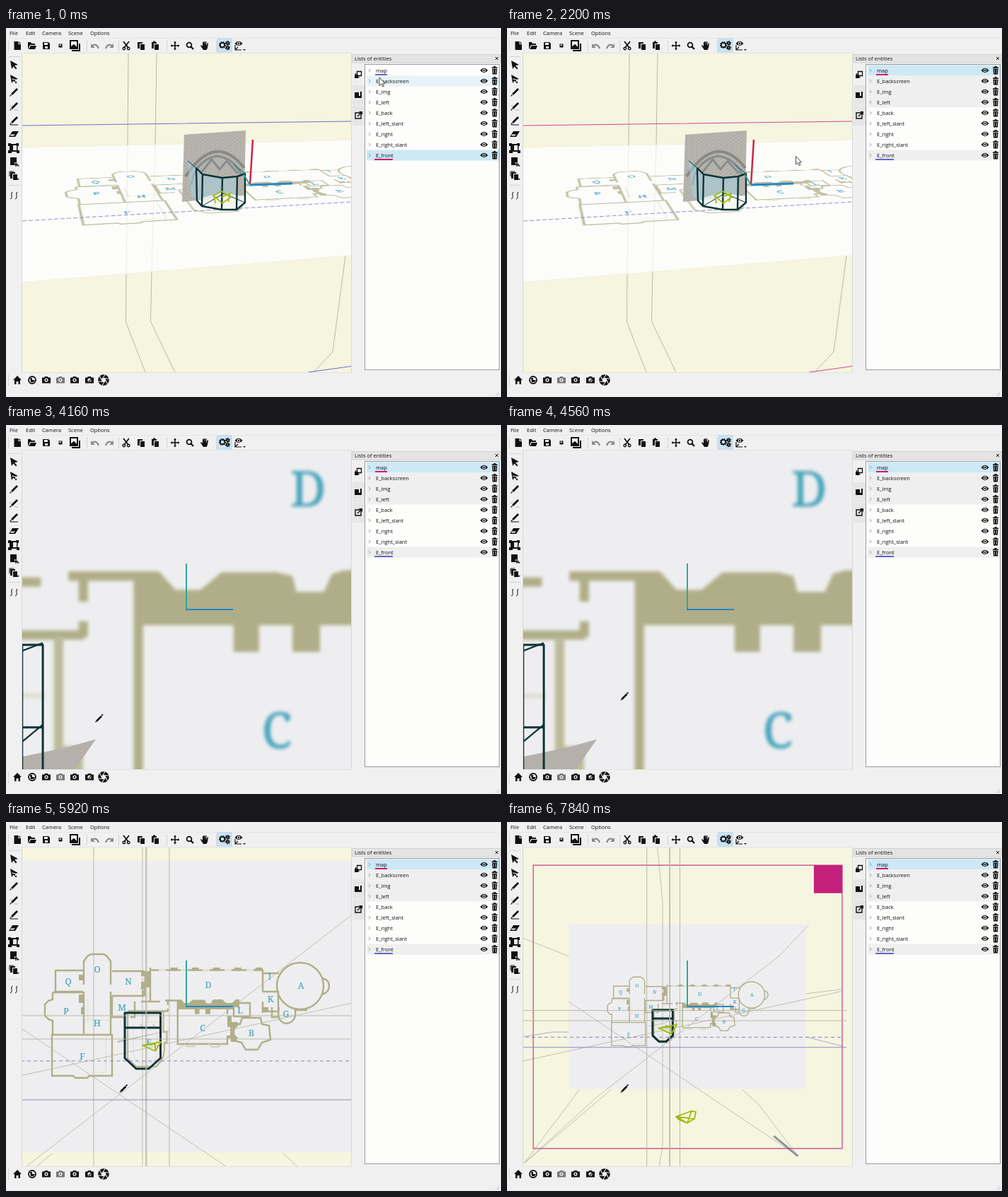
Write an HTML page that moves like this. It is 700x522 px and loops after 7880 ms.

```html
<!DOCTYPE html>
<html lang="en">
<head>
<meta charset="utf-8">
<title>Entity viewer</title>
<style>
html, body { margin: 0; width: 100%; height: 100%; overflow: hidden; background: #f0f0f0; }
#stage { position: absolute; left: 0; top: 0; width: 700px; height: 522px; overflow: hidden; background: #f0f0f0; }
svg { position: absolute; left: 0; top: 0; overflow: visible; }
#view { position: absolute; inset: 0; background: #f5f5e0; clip-path: inset(36px 212px 35px 23px); }
#plan { transform-origin: 0 0; }
text { font: 7.5px "Open Sans", "Noto Sans", sans-serif; fill: #111; }
#letters text { font: 400 12.4px "Noto Serif", serif; fill: #48a4bc; stroke: #48a4bc; stroke-width: .2; text-anchor: middle; }
.line { fill: none; vector-effect: non-scaling-stroke; }
.wire { fill: none; stroke: #0d3338; stroke-linejoin: round; vector-effect: non-scaling-stroke; }
.hidden { display: none; }
</style>
</head>
<body>
<div id="stage">
<svg id="ui" width="700" height="522"></svg>

<div id="view">
  <svg id="plan" width="700" height="522">
    <defs><filter id="soft" x="-5%" y="-5%" width="110%" height="110%"><feGaussianBlur stdDeviation=".5"/></filter></defs>
    <g id="planScale"><g transform="translate(-255 -261)">
      <rect id="sheet" x="-42" y="55" width="594" height="412"/>
      <g id="walls" filter="url(#soft)" fill="none" stroke="#b0ae88" stroke-width="2.4"></g>
      <g id="letters" filter="url(#soft)"></g>
    </g></g>
  </svg>

  <svg id="persp" width="700" height="522" fill="none">
    <defs><pattern id="stone" width="7" height="5" patternUnits="userSpaceOnUse">
      <rect width="7" height="5" fill="#b9b5af"/><path d="M0 1h3M4 3h3M2 4.500h2" stroke="#a39f99" stroke-width=".8"/>
    </pattern></defs>
    <g stroke="#b3b3a8" stroke-width=".9">
      <path d="M173 36 172 166M213 36 211 165M170 348 169.500 416 197 487M206 345 204.500 415 239 487M480 322 462 458 435 487"/>
      <path d="M172 166 170 348M211 165 206 345" opacity=".25"/>
    </g>
    <path id="horizon" d="M23 138 488 132M427 487 488 478.500" stroke-width="1.1"/>
    <path d="M23 273 488 246" stroke="#8584c4" stroke-width=".9" stroke-dasharray="6 3"/>
    <path d="M252 151 339 145 337 237 249 246Z" fill="url(#stone)"/>
    <path d="M254 210Q296 146 337 198" stroke="#898886" stroke-width="4"/>
    <path d="M262 222Q267 188 298 181 322 184 333 208M274 207 291 186 302 200 312 188 328 206" stroke="#878d8e" stroke-width="3"/>
    <path d="M257 190 278 206 306 211 327 209V238L306 233 278 246 262 238Z" fill="#a5d5e3" opacity=".5"/>
    <path d="M278 240 306 232 337 239V247L326 257H305L277 252Z" fill="#f4f6ef" opacity=".8"/>
    <g stroke="#0d3338" stroke-width="2.4" stroke-linejoin="round">
      <path d="M269 198 278 207 306 212 327 210 338 206V247L326 257H305L277 252 270 244ZM278 207 277 252M306 212 305 257M327 210 326 257"/>
      <path d="M322 193 338 206M257 188 269 198" stroke="#2d7f8c" stroke-width="1.500"/>
      <path d="M338 247 308 234 277 252" stroke-width="1"/>
    </g>
    <path d="M293 237 305 231 318 239 306 248ZM296 248 294 236M314 246 317 234 305 239" stroke="#9dbb12" stroke-width="1.700"/>
    <path d="M345 222 349 158" stroke="#c9283f" stroke-width="2.500"/>
    <path d="M345 222 405 220" stroke="#2288c4" stroke-width="2.800"/>
    <path d="M345 222 336 207" stroke="#2aa59a" stroke-width="2"/>
  </svg>

  <svg id="top" width="700" height="522" fill="none">
    <g id="ground">
      <g id="rays" stroke="#b4b4a4" stroke-width=".8"></g>
      <path class="line" d="M-900 77H390" stroke="#8281c2" stroke-width="1" stroke-dasharray="5 4"/>
      <rect class="line" x="-386" y="-354" width="774" height="710" stroke="#c63a8c" stroke-width="1.200"/>
      <rect x="317" y="-354" width="71" height="70" fill="#c4207c"/>
      <path id="picture" fill="#b5b0aa"/>
      <path id="glass" fill="#a5d2de"/>
      <path class="wire" d="M-87 9H-36.500V73L-53 88H-71L-87 73ZM-87 30H-36.500" stroke-width="3"/>
      <g id="inner">
        <path class="wire" d="M-87 10.500H-41.700L-36.500 8.500M-41.700 9V77M-41.700 33.600-36.500 29.300M-87 34Q-72 32-60 34T-41.700 33.600M-87 30Q-66 37-50 32" stroke-width="2.200"/>
      </g>
    </g>
    <g id="high">
      <path class="line" d="M-131-2000V2000M-56-2000V2000M-24-2000V2000M-900 13H514M-900 46H514" stroke="#b4b4a2" stroke-width=".9"/>
      <path class="line" d="M-57.500-2000V2000" stroke="#b4b4a2" stroke-width=".9"/>
      <path class="line" d="M-900 132H514" stroke="#8d8cc4" stroke-width="1"/>
    </g>
    <path d="M255 196V261" stroke="#2fa79d" stroke-width="2"/>
    <path d="M254 261H321" stroke="#2288c4" stroke-width="2"/>
    <g stroke="#9dbb12" stroke-width="1.800" stroke-linejoin="round">
      <path id="nearCam" d="M-13-1 13-6 5 7ZM-13-1 5-3 5 7"/>
      <path id="farCam" d="M-14 0 8-8 14-7 12 3 2 9ZM-14 0 12 3M-14 0-10 4 2 9M8-8 2 9"/>
    </g>
  </svg>
</div>

<svg id="pointer" width="700" height="522">
  <path id="arrow" d="M0 0V11.500L2.600 9 4.600 13 6.400 12.200 4.500 8.400H8Z" fill="#fff" stroke="#222" stroke-width=".8"/>
  <g id="brush"><path d="M-3.500 4 3.500-3" stroke="#111" stroke-width="2.600"/><path d="M-5.500 6-3 5-4.500 3.500ZM3-4.500 5-6 6-5 4.500-3Z" fill="#111"/></g>
</svg>
</div>

<script>
const LOOP = 7880, SELECT_AT = 1520, TOP_AT = 3480;
const PINK = "#c4207c", BLUE = "#6463d0";
const $ = id => document.getElementById(id);

function add(parent, tag, attrs, content) {
  const node = document.createElementNS("http://www.w3.org/2000/svg", tag);
  for (const key in attrs) node.setAttribute(key, attrs[key]);
  if (content) node.textContent = content;
  parent.appendChild(node);
  return node;
}
const ui = $("ui");
const box = (x, y, width, height, fill, extra) => add(ui, "rect", { x, y, width, height, fill, ...extra });
const label = (x, y, content) => add(ui, "text", { x, y }, content);
const icon = (x, y, d, color = "#111", extra) =>
  add(ui, "path", { d, transform: `translate(${x} ${y})`, fill: color, "fill-rule": "evenodd", ...extra });
const sketch = (x, y, d, width = 1.4, color = "#111") =>
  icon(x, y, d, "none", { stroke: color, "stroke-width": width });
const disc = r => `M${-r} 0A${r} ${r} 0 1 0 ${r} 0A${r} ${r} 0 1 0 ${-r} 0Z`;
const grip = (x, y, vertical) => {
  for (let i = 0; i < 8; i++) box(vertical ? x : x + i * 2, vertical ? y + i * 2 : y, 1, 1, "#b8b8b8");
};

// Menu and toolbars
[[5, "File"], [28, "Edit"], [51, "Camera"], [88, "Scene"], [119, "Options"]].forEach(([x, s]) => label(x, 9.5, s));
box(0, 14, 700, .7, "#e2e2e2");
box(22, 35.5, 467, 452, "#d8d8d8");
[3, 114, 159, 227, 297].forEach(x => grip(x, 18, true));
grip(4, 40); grip(4, 222); grip(3, 491, true);
box(299, 15, 20, 19, "#cbe4f3", { stroke: "#a6cfe8", "stroke-width": .7 });

const PAGE = "M-4.500-6H1.500V-2H5V6H-4.500ZM2.500-6 5-3H2.500Z";
const EYE = "M-5.500 0Q0-6.500 5.500 0Q0 6.500-5.500 0ZM-2.300 0A2.300 2.300 0 1 0 2.300 0A2.300 2.300 0 1 0-2.300 0Z" + disc(1.2);
const COPY = "M-5-5H2V-3H-2V4H-5ZM-1-2H5V6H-1Z";
const BRUSH = "M4-6 6-4-2 4-4 2ZM-6 6-4.500 3-3 4.500Z";
const ARROW = "M-5-6 6 0 1 1.200 4.500 5 3 6.500-.5 2.500-3 6Z";
icon(16, 25, PAGE);
icon(37, 25, "M-6-5H-2L-1-3H4V-1H-3L-6 5ZM-2 0H6L4 5H-5Z");
icon(57, 25, "M-5-5H3L5-3V5H-5ZM-3-4V-1H2V-4ZM-2 1V4H2V1Z");
icon(77, 25, "M-2.500-2.500H2.500V2.500H-2.500ZM-1.500-1.500V0H1V-1.500Z");
icon(97, 25, "M-7-8H5V5H-7ZM-5-6V1L-1-2 3 2V-6ZM0 6H8V8H-4V6Z");
icon(97, 25, "M-5 3-1-2 4 3ZM6-3H8V8H-2V6H6Z");
sketch(126, 26, "M-4-1Q2-5 5 3", 2.2, "#8b8b8b"); icon(126, 26, "M-6-4V2H0Z", "#8b8b8b");
sketch(146, 26, "M4-1Q-2-5-5 3", 2.2, "#8b8b8b"); icon(146, 26, "M6-4V2H0Z", "#8b8b8b");
sketch(170, 25, "M-4-6 3 3M4-6-3 3", 1.8);
[-3.2, 3.2].forEach(dx => sketch(170 + dx, 29, disc(1.7)));
icon(191, 25, COPY);
icon(211, 25, COPY + "M-3-6.500H0V-5H-3Z");
sketch(239, 25, "M-5 0H5M0-5V5", 1.6);
icon(239, 25, "M-6.500 0-4-2V2ZM6.500 0 4-2V2ZM0-6.500-2-4H2ZM0 6.500-2 4H2Z");
sketch(259, 24, disc(3.4), 1.8); sketch(259, 24, "M2.500 2.500 6 6", 2.4);
icon(281, 25, "M-2 6-6 0-5-1-3 1V-5H-1.500V-1-6H0V-1L1-6H2.300V0L4-4 5-3.500 4 3 2.500 6Z");
[[306, 24, 3.2], [313.5, 21.5, 1.7], [313.5, 28, 1.7]].forEach(([x, y, r]) => {
  sketch(x, y, disc(r), 1.8);
  sketch(x, y, disc(r + 1.2), 1.3).setAttribute("stroke-dasharray", "1.5 1.5");
});
icon(329, 22, EYE); sketch(329, 27, "M-5-3V4H4M-5 4-1 0", 1.2); icon(337, 31, "M-2-1H2L0 1Z");

icon(11, 52, ARROW);
icon(11, 72, ARROW); sketch(11, 72, "M0 6 5 1M-3 0 2 1", 1, "#f0f0f0");
icon(11, 91, BRUSH);
icon(11, 111, BRUSH); sketch(11, 111, "M1 5H6M-6-1H-2", .7, "#999");
icon(11, 131, BRUSH); sketch(11, 131, "M-5 6H6", 1);
icon(11, 150, "M-2-4H7L2 4H-7ZM-4 .5-5 2.500H0L2 .5Z");
icon(11, 170, "M-8-7H-4V-6H3V-7H7V-3H5.500V3H8V7H4V5H-3V7H-8V3H-6V-3H-8ZM-1-4V3H4V-4Z");
icon(11, 189, "M-5-6H4V1H1V5H-5Z"); sketch(14, 193, "M-3 0H3M0-3V3", 1.4);
icon(11, 209, COPY); sketch(8, 206, "M-3 4V-3H3", 1);
[195, 214].forEach(y => icon(17, y, "M-2-1H2L0 1Z"));
sketch(11, 237, "M-5 5Q-2 3-3 0T-2-5M2 5Q5 3 4 0T5-5", 1.2, "#444");

icon(16, 498, "M-6 0 0-6 6 0H4V6H1.500V2H-1.500V6H-4V0Z");
sketch(37, 498, disc(5), 1.8); icon(37, 498, "M-3-3H0V0H4L2 3H-2Z");
[57, 77, 97, 118].forEach((x, i) =>
  icon(x, 498, "M-6-3.500H-3L-2-5H2L3-3.500H6V4.500H-6Z" + disc(2.6) + (i === 3 ? "" : disc(1.2)), i === 1 ? "#777" : "#111"));
sketch(118, 498, "M-1 2 3-2", 1.1);
icon(138, 498, disc(7.8) + disc(2.8));
for (let i = 0; i < 6; i++)
  add(ui, "path", { d: "M-2.800 0 2-7.500", stroke: "#f0f0f0", "stroke-width": 1.1, transform: `translate(138 498) rotate(${i * 60})` });
for (let i = 0; i < 3; i++) for (let j = 0; j <= i; j++) box(692 + i * 2, 519 - j * 2, 1, 1, "#b5b5b5");

// Entity panel
box(490, 37.5, 209, 11.5, "#e4e4e4", { stroke: "#c9c9c9", "stroke-width": .7 });
label(493, 46, "Lists of entities");
sketch(694, 43, "M-2-2 2 2M2-2-2 2", 1);
box(490, 81, 17, 28, "#e6e6e6"); box(490, 110, 17, 28, "#e6e6e6");
sketch(498, 66, "M-1.500-4.500H4.500V1.500H-1.500ZM-3.500-2V3.500H1.500", 1.3); icon(496, 68, "M-3-2H2V3H-3Z");
icon(498, 95, "M-5-4H1V1H3V-5H5V4H-5Z");
sketch(498, 124, "M-4-4H4V4H-4ZM-1 1 5-5", 1.4); icon(498, 124, "M1-6H6V-1Z");
box(507.5, 51.5, 190, 432, "#fdfdfc", { stroke: "#9a9a9a", "stroke-width": 1 });
const names = ["map", "E_backscreen", "E_img", "E_left", "E_back", "E_left_slant", "E_right", "E_right_slant", "E_front"];
const TRASH = "M-4-4.500H-1.500V-6H1.500V-4.500H4V-3H-4ZM-3.500-2.300H3.500L3 5.500H-3ZM-1.700-1V4H-1V-1ZM1-1V4H1.700V-1Z";
const rows = names.map((name, i) => {
  const y = 60 + 15 * i;
  const row = box(510, y - 7.5, 187, 15, "none");
  sketch(514, y, "M-1.200-2.200 1.200 0-1.200 2.200", .8, "#8a8a8a");
  label(523, y + 2.7, name);
  icon(676, y, EYE); icon(691, y, TRASH);
  return row;
});
const mapMark = box(522, 65, 17, 2, BLUE), frontMark = box(521, 185, 26, 2, PINK);

// Floor plan
const wall = (d, extra) => add($("walls"), "path", { d, ...extra });
const SOLID = { fill: "#b0ae88", stroke: "none" };
const PALE = { stroke: "#dcdccb", "stroke-width": 1 };
wall("M204 206V253M203 209.500H364M363 209V240M363 209.500V214H386M363 240H385V268H364M330 256H345V275H322V262M363 254V270");
for (let i = 0; i < 5; i++) {
  wall(`M${216 + i * 31} 209.500h10`, { stroke: "#e9e9de" });
  wall(`M${232.7 + i * 30} 205.900h10v4.500h-10z`, SOLID);
}
wall("M191 211H203V234H197.500V246H192V238H195.500V237H191V226H195.500V218H191Z", SOLID);
wall("M243 251.300H248L252.300 256H258.600L264 251.500H278L282 252.500 283 256.500H290L292 252 295 251H306L311 256H320L325 251H330V262H322V265H289V271.800H282V265H273.500V271.800H267V265H243Z", SOLID);
wall("M191 254H218M172 267.500H229M225 252.500H243M228.800 252.500V259M228.800 264V268M242.800 252V314H313V306M313 265V272");
wall("M252 314 256 317.500H266L270 314M287 314 291 318H301L305 314", { stroke: "#d0d0c0", "stroke-width": 2.2 });
wall("M222.500 268V297H227.500V312H224V322L222 333 213 346H184L172 335V268", { stroke: "#bcba99" });
wall("M201 270V283H219M180 288V330L188 340H208L214 330V300", PALE);
wall("M189.500 287.500h3M207.500 287.500h3", { stroke: "#cfceb6" });
wall("M150 211H196M150 246H196M148 212V197L143 190 138 187H120L115 190 110 197V230M110 240V300M148 210V230M148 240V262");
wall("M109 210H70V240H109M66 241V251L60 253 55 258V274L60 279 66 281V301M109 241H66M150 246V276H166M176 276H182V254");
wall("M65 301H150V359H118L115 362H98L95 359H65ZM148 262V300");
wall("M103 216h6v8h-6zM103 244h6v12h-6zM106 262h5v10h-5z", SOLID);
wall("M141 302V354H120M112 280H146M116 250V284", PALE);
wall("M383 232A33 33 0 1 0 449 232A33 33 0 1 0 383 232M447 221Q457 223 457 232T447 244");
wall("M386 262Q382 284 397 285 411 283 409 266L426 266M376 262V276H386");
wall("M328 286H331L334 277H360L362 286 372 288 374 308 362 312 356 322H339L333 312 322 309");
wall("M313 274H319V283H328V289A9 9 0 0 0 328 305L324 311H318V306H312V302H317V290H313Z", SOLID);
wall("M364 262h7v6h-7z", SOLID);
const letters = { O: [129, 209], Q: [88, 226], N: [173, 226], D: [286, 231], I: [373, 219], A: [417, 232], K: [374, 251], L: [331, 267],
  G: [396, 272], P: [85, 268], M: [164, 263], H: [129, 285], C: [278, 292.5], B: [347, 299], F: [108, 332], E: [202, 312] };
for (const c in letters) add($("letters"), "text", { x: letters[c][0], y: letters[c][1] + 3.8 }, c);

// Sight lines, relative to the axes
["M304-205 232-128-222 223-409 393", "M-413-172-297-126", "M-297-12 277 375", "M386-38-413 137", "M-409 393-270 208M-409 393-190 208",
 "M137 208 180 247 277 375M215 324 277 375M220 330 270 370", "M-77-420-62-264V350L-74 420", "M297-32 386-43"]
  .forEach(d => add($("rays"), "path", { class: "line", d }));
add($("rays"), "path", { class: "line", d: "M-413 76-338 64H-297M297 76 391 100", stroke: "#9a99cc" });
add($("rays"), "path", { class: "line", d: "M217 325 277 375", stroke: "#8a9694", "stroke-width": 3 });

// Piecewise linear track: [time, ...values]
function track(t, keys) {
  let i = 0;
  while (i < keys.length - 2 && t > keys[i + 1][0]) i++;
  const [a, b] = [keys[i], keys[i + 1]];
  const p = Math.min(1, Math.max(0, (t - a[0]) / (b[0] - a[0])));
  return a.slice(1).map((v, n) => v + (b[n + 1] - v) * p);
}
const WHEEL = [[4720, 18], [5160, 12], [5920, 0], [6360, -6]];
const MOUSE = [[0, 528, 70], [160, 528, 70], [1000, 546, 66], [1900, 546, 64], [3000, 42, 495], [3640, 42, 495],
  [4360, 166, 384], [5200, 166, 383], [5700, 166, 377]];
const TILT = "matrix3d(1.335,.0379,0,.000407,-.0464,.0657,0,-.001318,0,0,1,0,345,222,0,1)";
const show = (id, on) => $(id).classList.toggle("hidden", !on);

function drawTop(s) {
  const place = k => `translate(255 261) scale(${k})`;
  $("planScale").setAttribute("transform", place(s));
  $("ground").setAttribute("transform", place(s));
  // Raised lines fall behind the camera when it comes close
  const lift = 1 - .4 * s;
  show("high", lift > .1);
  show("rays", lift > .1);
  if (lift > .1) $("high").setAttribute("transform", place(.6 * s / lift));
  show("inner", s > 1.5);
  const depth = 1 + 8 * Math.max(0, 1 - 1 / s);
  $("picture").setAttribute("d", `M-97 49-30 35-23 33-${23 + depth * .7} ${33 + depth}-97 ${50 + depth}Z`);
  $("glass").setAttribute("d", `M-97 49-43 37.500-48 ${38 + depth * .35}-97 ${49 + depth * .5}Z`);
  $("nearCam").setAttribute("transform", `translate(${255 - 49 * s} ${261 + 56 * s})`);
  $("farCam").setAttribute("transform", `translate(${255 - 3.5 * s} ${261 + 276 * s})`);
}

let lastScale;
function render(t) {
  const top = t >= TOP_AT, picked = t >= SELECT_AT;
  const scale = top ? 1.1 ** Math.round(track(t, WHEEL)[0]) : 0;
  if (scale !== lastScale) {
    lastScale = scale;
    show("persp", !top);
    show("top", top);
    $("plan").style.transform = top ? "none" : TILT;
    $("sheet").setAttribute("fill", top ? "#eeeef0" : "#fcfcfb");
    $("walls").setAttribute("opacity", top ? 1 : .75);
    if (top) drawTop(scale);
    else $("planScale").removeAttribute("transform");
  }
  $("horizon").setAttribute("stroke", picked ? "#cf4a90" : "#7271c8");
  mapMark.setAttribute("fill", picked ? PINK : BLUE);
  frontMark.setAttribute("fill", picked ? BLUE : PINK);

  const [x, y] = track(t, MOUSE);
  const hovered = x > 508 ? Math.floor((y - 52.5) / 15) : -1;
  const selected = picked ? 0 : 8;
  rows.forEach((row, i) => {
    const idle = picked && (i < 4 || i === 8) ? "#efeff0" : "none";
    row.setAttribute("fill", i === selected ? "#cde8f6" : i === hovered ? "#e7f3f8" : idle);
  });
  const painting = top && y < 486;
  show("arrow", !painting);
  show("brush", painting);
  $(painting ? "brush" : "arrow").setAttribute("transform", `translate(${x} ${y})`);
}

const start = performance.now();
function tick() {
  const t = (performance.now() - start) % LOOP;
  render(Math.floor(t / 40) * 40);
  requestAnimationFrame(tick);
}
render(0);
requestAnimationFrame(tick);
</script>
</body>
</html>
```
